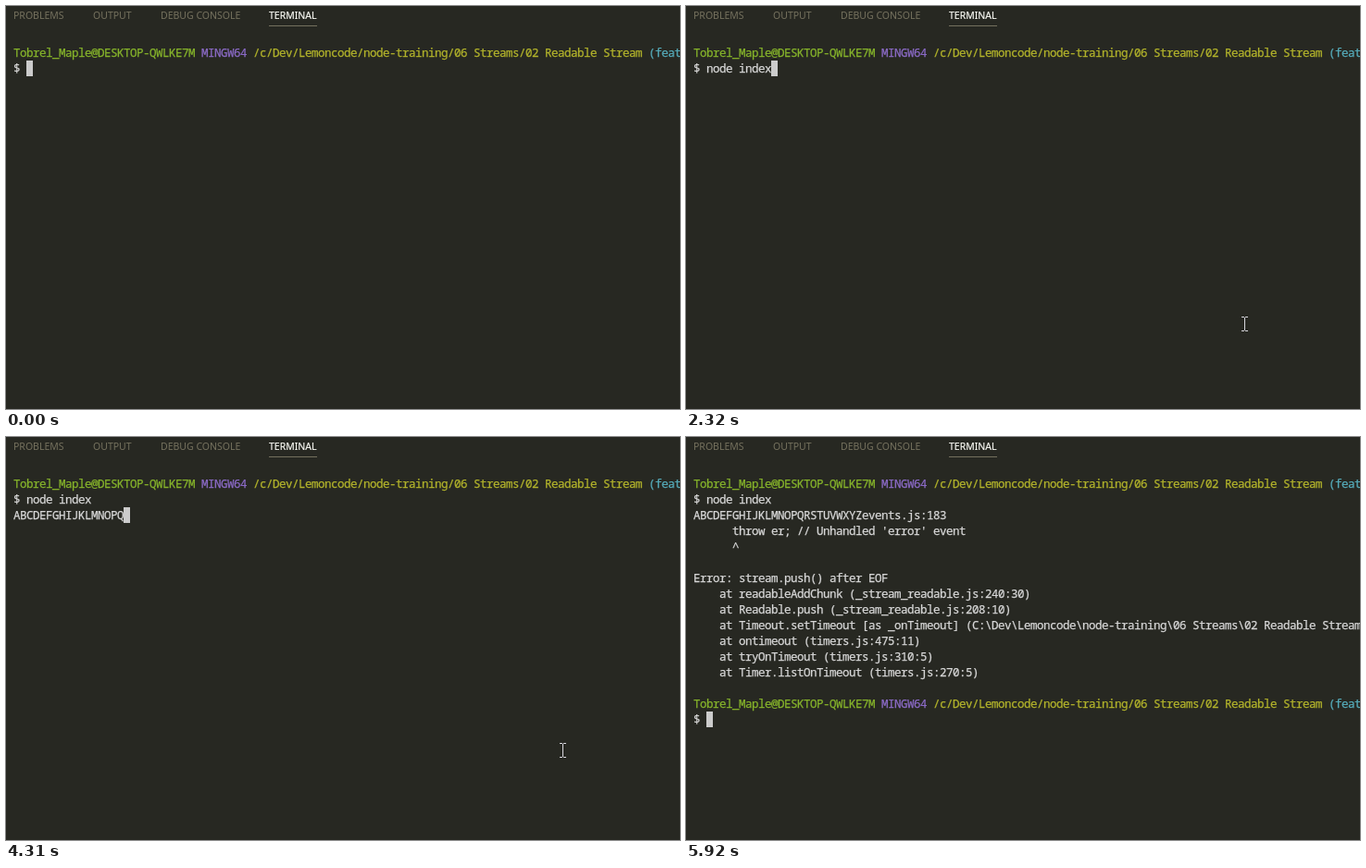
An HTML page for the animation above (6650 ms loop, 728 by 436 pixels).

```html
<!DOCTYPE html>
<html lang="en">
<head>
<meta charset="utf-8">
<title>Terminal</title>
<style>
  html, body { margin: 0; width: 100%; height: 100%; overflow: hidden; background: #272822; }
  #stage { position: relative; width: 100%; height: 100%; overflow: hidden; contain: strict; }
  .tab { position: absolute; top: 2px; height: 19px; font: 10.5px/16px "Noto Sans", "Open Sans", sans-serif; color: #75715e; white-space: pre; }
  .active { width: 52px; color: #f8f8f2; border-bottom: 1px solid #75715e; -webkit-text-stroke: .2px; }
  #screen { position: absolute; left: 8px; top: 42px; margin: 0; color: #d8d8d8;
    font: 12.5px/17px "Noto Sans Mono", "DejaVu Sans Mono", monospace;
    letter-spacing: calc(7px - 1ch); -webkit-text-stroke: .25px; }
  .user { color: #86b42b; }
  .sys { color: #8c6bc8; }
  .path { color: #b3b42b; }
  .branch { color: #56adbc; }
  #caret { position: absolute; width: 7px; height: 17px; background: #ccc; }
  #mouse { position: absolute; left: 0; top: 0; }
</style>
</head>
<body>
<div id="stage">
  <div class="tab" style="left:8px">PROBLEMS</div>
  <div class="tab" style="left:94px">OUTPUT</div>
  <div class="tab" style="left:167px">DEBUG CONSOLE</div>
  <div class="tab active" style="left:284px">TERMINAL</div>
  <pre id="screen"></pre>
  <div id="caret"></div>
  <svg id="mouse" width="7" height="16" shape-rendering="crispEdges">
    <path d="M0 0h3v1h1v-1h3v1h-3v14h3v1h-3v-1h-1v1h-3v-1h3v-14h-3z" fill="#d8d7dd"/>
  </svg>
</div>
<script>
// The picture advances in ticks of 77 ms; all moments below are ticks.
const LOOP = 6650, TICK = 77, LEAD = 12;
const ENTER = 33, CRASH = 69, MOUSE_IN = 3, MOUSE_OUT = 77;
const COMMAND = "node index", LETTERS = "ABCDEFGHIJKLMNOPQRSTUVWXYZ";

// Each pointer move starts where the previous one ended.
const ENTRY = { x: 662, y: 415 };
const moves = [
  { from: 3, to: 8, x: 603, y: 344, power: 0.5 },
  { from: 40, to: 42, x: 597, y: 339, power: 1 },
  { from: 54, to: 56, x: 601, y: 339, power: 1 },
  { from: 73, to: 76, x: 687, y: 430, power: 2 }
];

const span = (cls, text) => `<span class="${cls}">${text}</span>`;
const PROMPT = [
  span("user", "Tobrel_Maple@DESKTOP-QWLKE7M"),
  span("sys", "MINGW64"),
  span("path", "/c/Dev/Lemoncode/node-training/06 Streams/02 Readable Stream"),
  span("branch", "(feat")
].join(" ") + "\n$ ";

const ERROR = String.raw`events.js:183
      throw er; // Unhandled 'error' event
      ^

Error: stream.push() after EOF
    at readableAddChunk (_stream_readable.js:240:30)
    at Readable.push (_stream_readable.js:208:10)
    at Timeout.setTimeout [as _onTimeout] (C:\Dev\Lemoncode\node-training\06 Streams\02 Readable Stream
    at ontimeout (timers.js:475:11)
    at tryOnTimeout (timers.js:310:5)
    at Timer.listOnTimeout (timers.js:270:5)

`;

const [screen, caret, mouse] = ["screen", "caret", "mouse"].map(id => document.getElementById(id));
let shown;

// The part of text written so far, one character every `pace` ticks.
const typed = (text, tick, start, pace) =>
  text.slice(0, Math.max(0, Math.ceil((tick + 1 - start) / pace)));

function pointerAt(tick) {
  let { x, y } = ENTRY;
  for (const m of moves) {
    const p = Math.min(1, Math.max(0, (tick - m.from) / (m.to - m.from))) ** m.power;
    x += (m.x - x) * p;
    y += (m.y - y) * p;
  }
  return [Math.round(x), Math.round(y)];
}

function draw(time) {
  const tick = Math.floor((time + LEAD) / TICK);
  let line = "$ " + typed(COMMAND, tick, 15.16, 1.65), row = 1;
  let text = PROMPT + line.slice(2);
  if (tick >= ENTER) {
    line = typed(LETTERS, tick, 36.17, 1.28);
    text += "\n" + line;
    row = 2;
  }
  if (tick >= CRASH) {
    line = "$ ";
    text += ERROR + PROMPT;
    row = 15;
  }
  if (text !== shown) screen.innerHTML = shown = text;
  caret.style.left = 8 + line.length * 7 + "px";
  caret.style.top = 42 + row * 17 + "px";

  const [x, y] = pointerAt(tick);
  mouse.style.display = tick >= MOUSE_IN && tick < MOUSE_OUT ? "block" : "none";
  mouse.style.transform = `translate(${x - 3}px, ${y - 8}px)`;
}

const start = performance.now();
function animate() {
  draw((performance.now() - start) % LOOP);
  requestAnimationFrame(animate);
}
animate();
</script>
</body>
</html>
```
